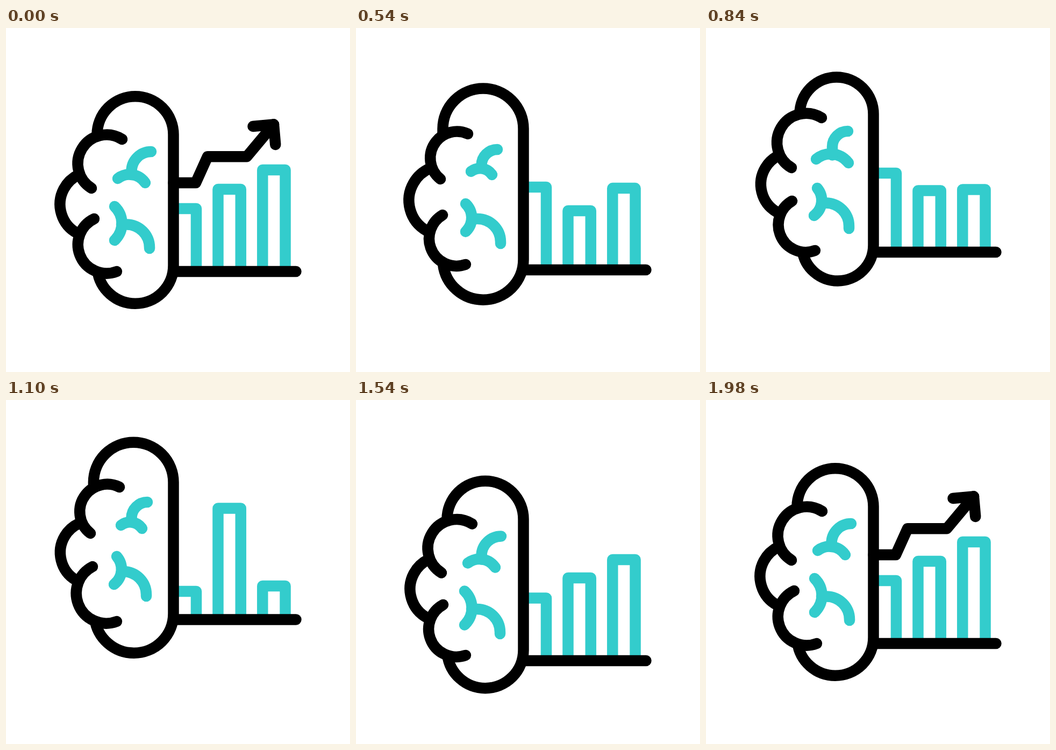
An HTML page with a canvas that plays this animation: 640x640 px, repeating every 2.4 s.

```html
<!DOCTYPE html>
<html lang="en">
<head>
<meta charset="utf-8">
<title>Growing mind</title>
<style>
html, body { margin: 0; width: 100%; height: 100%; overflow: hidden; background: #fff; }
canvas { display: block; width: 100vw; height: 100vh; }
</style>
</head>
<body>
<canvas id="stage" width="640" height="640"></canvas>
<script>
const ctx = document.getElementById('stage').getContext('2d');
const LOOP = 2400, BLACK = '#000', TEAL = '#33cccc', SPINE = 311.5;

// shell: top, bottom, upper radius, lower radius; bars: floor, three heights
// arcs: x1, y1, x2, y2, bulge
const rest = {
  shell: [127.3, 512.7, 71, 71],
  bars: [453, 117, 153, 189],
  high: [159, 298, 216, 207, 54],
  side: [133, 382, 135, 273, 33.5],
  low: [206, 453, 164, 355, 51],
  cap: [270, 230], fork: [208, 280, 259, 288],
  hook: [202, 332, 202, 395], tail: [267, 410]
};
const stretch = {
  shell: [112.5, 505.7, 75, 75],
  bars: [450, 154, 110, 152],
  high: [157, 281, 208, 197, 43.4],
  side: [131, 377, 138, 261, 36],
  low: [204, 440, 161, 348, 46],
  cap: [263, 226], fork: [214, 267, 253, 273],
  hook: [204, 327, 204, 379], tail: [269, 401]
};
const squash = {
  shell: [91.5, 470.5, 68.5, 66.5],
  bars: [417, 147, 114.5, 116.5],
  high: [159, 260, 215, 167, 55],
  side: [131, 342, 132, 239, 29.5],
  low: [203, 414, 160, 322, 46.5],
  cap: [264, 192], fork: [205, 244, 265, 251],
  hook: [207, 298, 201, 349], tail: [266, 373]
};
const peak = {
  shell: [78.7, 470.7, 74.3, 73.5],
  bars: [408.5, 52.5, 207, 62.5],
  high: [157, 248, 211, 162, 46],
  side: [130, 335, 135, 230, 31.5],
  low: [206, 412, 161, 310, 52.5],
  cap: [263, 190], fork: [214, 233, 253, 239],
  hook: [206, 291, 201, 343], tail: [261, 365]
};
const drop = {
  shell: [125.5, 512.5, 71.7, 71.7],
  bars: [431, 103, 165, 162.5],
  high: [158, 294, 212, 207, 48.5],
  side: [134, 385, 136, 271, 36.5],
  low: [200, 448, 157, 364, 39],
  cap: [266, 232], fork: [209, 278, 258, 287],
  hook: [204, 336, 204, 389], tail: [271, 413]
};
const rise = { ...rest, bars: [461.5, 116.5, 154, 188], low: [204, 451.5, 162, 357.5, 47.5], tail: [268, 411.5] };

function mix(a, b, k) {
  const out = {};
  for (const p in a) out[p] = a[p].map((v, i) => v + (b[p][i] - v) * k);
  return out;
}

const key = (time, pose, dy = 0) => ({ time, pose: { ...pose, shift: [dy] } });
const keys = [
  key(220, rest),
  key(370, mix(rest, stretch, 0.35), 39),
  key(540, stretch),
  key(740, mix(stretch, squash, 0.84), 0),
  key(840, squash),
  key(1100, peak),
  key(1260, mix(peak, drop, 0.5), -24),
  key(1380, drop),
  key(1470, mix(drop, rise, 0.7), 34),
  key(1540, rise, 23.6),
  key(1740, rest, -14),
  key(1980, rest)
];

// Smooth interpolation that never overshoots a key
function sample(t, part, i) {
  const val = n => keys[n].pose[part][i];
  const last = keys.length - 1;
  if (t <= keys[0].time) return val(0);
  if (t >= keys[last].time) return val(last);
  let n = 0;
  while (t >= keys[n + 1].time) n++;
  const rate = m => (val(m + 1) - val(m)) / (keys[m + 1].time - keys[m].time);
  const slope = m => {
    if (m === 0 || m === last) return 0;
    const a = rate(m - 1), b = rate(m);
    return a * b <= 0 ? 0 : 2 * a * b / (a + b);
  };
  const span = keys[n + 1].time - keys[n].time, u = (t - keys[n].time) / span;
  const w = u * u * (3 - 2 * u);
  return val(n) * (1 - w) + val(n + 1) * w +
    span * u * (1 - u) * (slope(n) * (1 - u) - slope(n + 1) * u);
}

function poseAt(t) {
  const out = {};
  for (const p in keys[0].pose) out[p] = keys[0].pose[p].map((_, i) => sample(t, p, i));
  return out;
}

function stroke(color, cap, trace) {
  ctx.strokeStyle = color;
  ctx.lineCap = cap;
  ctx.beginPath();
  trace();
  ctx.stroke();
}

function poly(points) {
  points.forEach(([x, y], i) => i ? ctx.lineTo(x, y) : ctx.moveTo(x, y));
}

function bow(color, [x1, y1, x2, y2, bulge]) {
  const dx = x2 - x1, dy = y2 - y1, c = Math.hypot(dx, dy);
  const h = bulge || c * 0.215;
  const r = (c * c / 4 + h * h) / (2 * h);
  const cx = (x1 + x2) / 2 + dy / c * (h - r);
  const cy = (y1 + y2) / 2 - dx / c * (h - r);
  const a = Math.atan2(y1 - cy, x1 - cx);
  stroke(color, 'round', () => ctx.arc(cx, cy, r, a, a + 4 * Math.atan(2 * h / c)));
}

function drawBars([floor, ...heights]) {
  heights.forEach((h, i) => {
    const right = 354 + i * 82.8, left = i ? right - 42.3 : SPINE, top = floor - h;
    const points = [[left, top], [right, top], [right, floor]];
    if (i) points.unshift([left, floor]);
    stroke(TEAL, 'butt', () => poly(points));
  });
  stroke(BLACK, 'round', () => poly([[SPINE, floor], [539.5, floor]]));
}

function drawShell([top, bottom, ru, rl]) {
  stroke(BLACK, 'butt', () => {
    ctx.moveTo(SPINE - 2 * ru, top + ru + 8);
    ctx.arc(SPINE - ru, top + ru, ru, Math.PI, 2 * Math.PI);
    ctx.arc(SPINE - rl, bottom - rl, rl, 0, Math.PI - Math.asin(9 / rl));
  });
}

function drawFolds({ cap, fork, hook, tail }) {
  bow(TEAL, fork);
  bow(TEAL, hook);
  const jx = (fork[0] + fork[2]) / 2, jy = (fork[1] + fork[3]) / 2 - 11;
  stroke(TEAL, 'round', () => {
    ctx.moveTo(...cap);
    ctx.arcTo(jx, cap[1], jx, jy, Math.min(cap[0] - jx, jy - cap[1]));
    ctx.lineTo(jx, jy);
  });
  const hx = (hook[0] + hook[2]) / 2 + 13, hy = (hook[1] + hook[3]) / 2 + 2;
  stroke(TEAL, 'round', () => {
    ctx.moveTo(hx, hy);
    ctx.arcTo(tail[0], hy, ...tail, Math.min(tail[1] - hy, 43));
    ctx.lineTo(...tail);
  });
}

function trim(points, k) {
  if (k <= 0) return;
  const len = i => Math.hypot(points[i][0] - points[i - 1][0], points[i][1] - points[i - 1][1]);
  let left = 0;
  for (let i = 1; i < points.length; i++) left += len(i);
  left *= k;
  const out = [points[0]];
  for (let i = 1; i < points.length && left > 0; i++) {
    const f = Math.min(1, left / len(i)), [x, y] = points[i - 1];
    out.push([x + (points[i][0] - x) * f, y + (points[i][1] - y) * f]);
    left -= len(i);
  }
  stroke(BLACK, 'round', () => poly(out));
}

const clamp = v => Math.max(0, Math.min(1, v));
const ease = v => v * v * (3 - 2 * v);

function drawArrow(t, dy) {
  const k = t < 1000 ? 1 - ease(clamp((t - 220) / 260)) : ease(clamp((t - 1560) / 360));
  const shaft = clamp(k / 0.82), head = clamp((k - 0.82) / 0.18);
  ctx.save();
  ctx.translate(0, dy);
  trim([[SPINE, 288], [353, 288], [375, 239.3], [448, 239.3], [498, 179.5]], shaft);
  trim([[498, 179.5], [459.5, 183]], head);
  trim([[498, 179.5], [501.3, 217]], head);
  ctx.restore();
}

function draw(t) {
  const p = poseAt(t);
  ctx.setTransform(1, 0, 0, 1, 0, 0);
  ctx.fillStyle = '#fff';
  ctx.fillRect(0, 0, 640, 640);
  ctx.translate(0, p.shift[0]);
  ctx.lineWidth = 20.5;
  ctx.lineJoin = 'round';
  drawBars(p.bars);
  drawArrow(t, p.bars[0] - rest.bars[0]);
  drawFolds(p);
  drawShell(p.shell);
  [p.high, p.side, p.low].forEach(a => bow(BLACK, a));
}

const start = performance.now();
function tick() {
  draw((performance.now() - start) % LOOP);
  requestAnimationFrame(tick);
}
tick();
</script>
</body>
</html>
```
